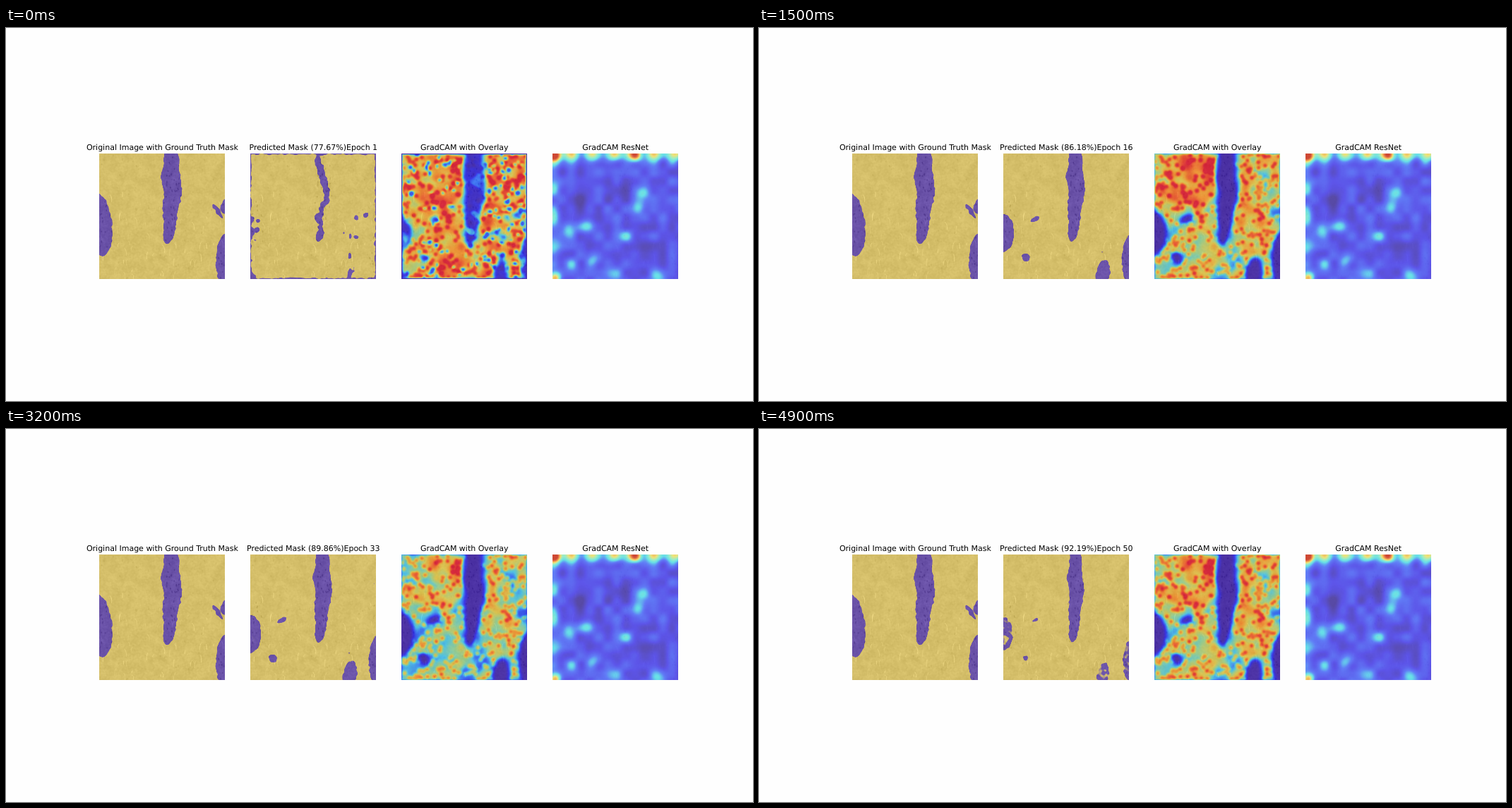
Animation of 1058x529 px, one loop 5000 ms. Source, as an HTML page with a canvas:

```html
<!DOCTYPE html>
<html lang="en">
<head>
<meta charset="utf-8">
<title>Segmentation training</title>
<style>
  html, body { margin: 0; width: 100%; height: 100%; overflow: hidden; background: #fefefe; }
  canvas, svg { position: absolute; left: 0; top: 0; display: block; }
  text { font: 11px "DejaVu Sans", sans-serif; text-anchor: middle; text-rendering: geometricPrecision; }
</style>
</head>
<body>
<canvas id="stage" width="1058" height="529"></canvas>
<svg width="1058" height="529">
  <text x="221.4" y="172.5">Original Image with Ground Truth Mask</text>
  <text x="435.3" y="172.5" id="title"></text>
  <text x="649.2" y="172.5">GradCAM with Overlay</text>
  <text x="863.1" y="172.5">GradCAM ResNet</text>
</svg>
<script>
const N = 178, PAD = 14, SIZE = N + 2 * PAD, TOP = 178, LEFT = [132, 346, 560, 774];
const stage = document.getElementById('stage').getContext('2d');
const title = document.getElementById('title');

// Training state at key epochs, linear in between
const KEYS = [1, 11, 21, 28, 38, 46, 50];
const SCORE = [77.67, 83.63, 88.73, 88.93, 90.79, 91.65, 92.19];
const AREA = [.35, 1, .8, .95, .88, .84, .8];
const WARMTH = [.82, .72, .66, .5, .68, .56, .68];

// Vessel outline as x, y pairs in panel pixels
const VESSEL = [92,-12, 91,20, 86,40, 94,53, 89,70, 92,108, 89,119, 97,132, 104,122,
  109,104, 111,82, 119,54, 114,34, 114,16, 111,-12];
// Ovals: x, y, rx, ry, turn
const TRUTH = [[0, 100, 18, 46, -.12], [180, 152, 15, 38, 0], [168, 82, 13, 2.8, .97], [180, 74, 7, 12, .3]];
const GUESS = [[-1, 113, 18, 31, 0], [181, 150, 15, 38, 0], [141, 170, 11, 22, .15],
  [45, 93, 10, 4, -.5], [32, 148, 7, 9, -.5]];

const clamp = (v, a = 0, b = 1) => Math.min(b, Math.max(a, v));
const smooth = (a, b, v) => { const t = clamp((v - a) / (b - a)); return t * t * (3 - 2 * t); };
const mix = (a, b, t) => a + (b - a) * t;
const hill = (d, width) => Math.exp(-((d / width) ** 2));
const wave = (d, period) => Math.cos(2 * Math.PI * d / period);

function track(values, epoch) {
  let k = 0;
  while (k < KEYS.length - 2 && epoch >= KEYS[k + 1]) k++;
  return mix(values[k], values[k + 1], (epoch - KEYS[k]) / (KEYS[k + 1] - KEYS[k]));
}

function random(seed) {
  return () => {
    seed = seed + 0x6D2B79F5 | 0;
    let t = Math.imul(seed ^ seed >>> 15, 1 | seed);
    t = t + Math.imul(t ^ t >>> 7, 61 | t) ^ t;
    return ((t ^ t >>> 14) >>> 0) / 4294967296;
  };
}

function field(fn) {
  const out = new Float32Array(N * N);
  for (let y = 0, i = 0; y < N; y++) for (let x = 0; x < N; x++) out[i++] = fn(x, y);
  return out;
}

// Value noise, -1 to 1, on a lattice turned by an angle
function noise(cell, seed, turn = .6) {
  const rnd = random(seed), grid = Float32Array.from({ length: 65536 }, () => rnd() * 2 - 1);
  const g = (i, j) => grid[(i & 255) + (j & 255) * 256], cos = Math.cos(turn) / cell, sin = Math.sin(turn) / cell;
  return field((x, y) => {
    const u = x * cos + y * sin, v = y * cos - x * sin, i = Math.floor(u), j = Math.floor(v);
    const a = smooth(0, 1, u - i), b = smooth(0, 1, v - j);
    return mix(mix(g(i, j), g(i + 1, j), a), mix(g(i, j + 1), g(i + 1, j + 1), a), b);
  });
}

const bumps = (radius, points) => field((x, y) =>
  points.reduce((sum, [px, py]) => sum + hill(Math.hypot(x - px, y - py), radius), 0));

function surface() {
  const c = document.createElement('canvas');
  c.width = c.height = SIZE;
  return c.getContext('2d', { willReadFrequently: true });
}
const sharp = surface(), soft = surface();

// Paints in grey, blurs, and returns brightness 0 to 1
function layer(blur, back, paint) {
  sharp.fillStyle = back;
  sharp.fillRect(0, 0, SIZE, SIZE);
  sharp.save();
  sharp.translate(PAD, PAD);
  sharp.fillStyle = sharp.strokeStyle = '#fff';
  paint(sharp);
  sharp.restore();
  soft.filter = `blur(${blur}px)`;
  soft.drawImage(sharp.canvas, 0, 0);
  const data = soft.getImageData(PAD, PAD, N, N).data;
  return Float32Array.from({ length: N * N }, (_, i) => data[i * 4] / 255);
}

function vessel(width = 1, height = 1) {
  const path = new Path2D(), n = VESSEL.length / 2;
  const px = i => 103 + (VESSEL[i % n * 2] - 103) * width, py = i => VESSEL[i % n * 2 + 1] * height;
  path.moveTo((px(0) + px(n - 1)) / 2, py(0));
  for (let i = 0; i < n; i++)
    path.quadraticCurveTo(px(i), py(i), (px(i) + px(i + 1)) / 2, (py(i) + py(i + 1)) / 2);
  return path;
}

function addOval(path, x, y, rx, ry, turn = 0) {
  const oval = new Path2D();
  oval.ellipse(x, y, rx, ry, turn, 0, 7);
  path.addPath(oval);
}

function scatter(count, seed, place) {
  const path = new Path2D(), rnd = random(seed);
  for (let i = 0; i < count; i++) addOval(path, ...place(rnd, i / count));
  return path;
}

function truth() {
  const path = vessel();
  TRUTH.forEach(oval => addOval(path, ...oval));
  return path;
}

// Small patches shrink faster than large ones
function patches(area) {
  const path = new Path2D();
  for (const [x, y, rx, ry, turn] of GUESS) {
    const k = area ** (rx < 11 ? 3 : 1);
    addOval(path, x, y, rx * k, ry * k, turn);
  }
  return path;
}

// Broken pieces along the vessel, bulging right halfway down
const islands = scatter(19, 4, (rnd, t) => {
  const y = t * 125;
  return [98 + 12 * hill(y - 58, 20) + rnd() * 6 - 3, y, 2 + rnd() * 3, 3 + rnd() * 5];
});
const strays = k => scatter(16, 15, rnd => {
  const side = rnd() < .3 ? rnd() * 14 : N - 48 * rnd();
  return [side, 85 + rnd() * 92, k * (1 + rnd() * 3), k * (1 + rnd() * 4)];
});
const specks = k => scatter(10, 6, rnd =>
  [130 + rnd() * 46, 32 + rnd() * 14 + (rnd() < .3 ? 100 : 0), k * (1 + rnd() * 2.5), k * (1.5 + rnd())]);

function paintGuess(c, s) {
  const grey = 255 * s.solid;
  c.fillStyle = `rgb(${grey},${grey},${grey})`;
  c.fill(patches(s.area));
  c.fillStyle = '#fff';
  c.fill(strays(s.early));
  c.fill(specks(s.area ** 6));
  const shape = vessel(mix(s.area, 1, s.early), .97);
  if (!s.early) return c.fill(shape);
  c.save();
  c.clip(shape);
  c.fill(islands);
  c.lineWidth = (1 - s.early) * 24;
  c.stroke(islands);
  c.restore();
  c.globalAlpha = s.early;
  c.lineWidth = 2.6;
  c.strokeRect(0, 0, N, N);
}

function paintCold(c, s) {
  const shape = patches(s.area ** .25);
  shape.addPath(vessel());
  shape.addPath(strays(s.early));
  c.lineWidth = 4;
  c.fill(shape);
  c.stroke(shape);
}

// Tissue grain: pale fibres and dark nuclei
function paintTissue(c) {
  const rnd = random(41);
  for (let i = 0; i < 60; i++) {
    const x = rnd() * N, y = N * Math.sqrt(rnd()), dx = (rnd() - .5) * 9, dy = 3 + rnd() * 9;
    c.globalAlpha = .2 + rnd() * .5;
    c.beginPath();
    c.moveTo(x, y);
    c.quadraticCurveTo(x + dx, y + dy * .4, x + dx * .7, y + dy);
    c.stroke();
  }
  const dot = rnd => [rnd() * N, rnd() * N, 1, 1 + rnd() * 1.2, rnd() - .5];
  c.fillStyle = '#000';
  c.globalAlpha = .25;
  c.fill(scatter(60, 42, dot));
  c.clip(truth());
  c.globalAlpha = .55;
  c.fill(scatter(480, 43, dot));
}

// Evenly spaced colour stops
function palette(...stops) {
  const rgb = stops.map(h => [1, 3, 5].map(k => parseInt(h.slice(k, k + 2), 16)));
  return v => {
    const p = clamp(v) * (rgb.length - 1), k = Math.min(Math.floor(p), rgb.length - 2);
    return rgb[k].map((a, j) => mix(a, rgb[k + 1][j], p - k));
  };
}
const heatColour = palette('#4c32a4', '#3a34e2', '#3e73f0', '#50c0e0', '#96ca8e', '#d8c250', '#ea9236', '#e45034', '#d4283c');
const camColour = palette('#584aa5', '#5c54e8', '#607df6', '#66dee8', '#98ecc8', '#ece27a', '#f4aa52', '#e07048', '#ce4834');
const maskColour = palette('#d4be69', '#6a52a8');

const marks = layer(.6, '#808080', paintTissue), blotch = noise(9, 3), speckle = noise(2.2, 5);
const grain = marks.map((m, i) => (m - .5) * 70 + (blotch[i] + speckle[i]) * 5);
const ragged = noise(4.5, 12), broad = noise(28, 21), medium = noise(12, 22);
const spots = layer(1.8, '#000', c => c.fill(scatter(400, 23, rnd => [rnd() * N, rnd() * N, 3, 3])));
const pits = layer(1.5, '#000', c => c.fill(scatter(150, 24, rnd =>
  [N * rnd() ** .7, rnd() * N, 1.5 + rnd() * 2.5, 1.5 + rnd() * 2.5])));
const hot = bumps(12, [[15, 62], [75, 25], [45, 14], [130, 58], [155, 97]]);
const cold = bumps(13, [[45, 92], [60, 150], [158, 40], [120, 152], [172, 80], [90, 168]]);

function show(panel, tint, colour) {
  const img = stage.createImageData(N, N);
  for (let i = 0; i < N * N; i++) {
    const rgb = colour(i, i % N, Math.floor(i / N));
    for (let k = 0; k < 3; k++) img.data[i * 4 + k] = rgb[k] + grain[i] * tint;
    img.data[i * 4 + 3] = 255;
  }
  stage.putImageData(img, LEFT[panel], TOP);
}

function showMask(panel, cover) {
  show(panel, 1, i => maskColour(cover[i] > .03 ? smooth(.38, .62, cover[i] + ragged[i] * .35) : 0));
}

function showHeat(s) {
  const cover = layer(3, '#000', c => paintCold(c, s)), late = 1 - s.early;
  const corner = .05 + .2 * hill(s.epoch - 11, 7);
  show(2, .6, (i, x, y) => {
    const edge = Math.min(x, y, N - 1 - x, N - 1 - y);
    let v = s.warmth + .1 * broad[i] + .16 * medium[i] + .32 * (spots[i] - .32);
    v += late * (corner * hill(Math.hypot(x - 38, y - 32), 45) + .55 * (1 - s.warmth) * hot[i] - .24 * cold[i]);
    v = Math.max(v - .6 * s.early * pits[i], .2);
    v *= 1 - cover[i] * (1 - s.early * (.1 + .25 * smooth(0, .6, medium[i])));
    return heatColour(v * (1 - mix(.35, 1, s.early) * Math.exp(-edge / 1.3)));
  });
}

function showCam() {
  const ripple = noise(13, 31, 0);
  const cool = bumps(10, [[127, 58], [124, 76], [48, 102], [22, 108], [104, 117], [59, 150], [27, 157], [150, 174], [90, 170]]);
  const dim = bumps(18, [[130, 142], [38, 64], [94, 52]]);
  const corners = bumps(7, [[4, 3], [117, 2], [4, 176]]);
  show(3, .2, (i, x, y) => {
    const rim = hill(y, 10) * (.36 + .14 * wave(x - 56, 29)) + hill(x, 10) * (.16 + .1 * wave(y - 4, 43));
    return camColour(.15 + rim + .2 * cool[i] - .09 * dim[i] + .4 * corners[i] + .09 * ripple[i]);
  });
}

function showEpoch(epoch) {
  const s = {
    epoch,
    area: track(AREA, epoch),
    warmth: track(WARMTH, epoch),
    early: clamp(1 - (epoch - 1) / 8),
    solid: 1 - .32 * (epoch / 50) ** 3
  };
  title.textContent = `Predicted Mask (${track(SCORE, epoch).toFixed(2)}%)Epoch ${epoch}`;
  showMask(1, layer(1.2, '#000', c => paintGuess(c, s)));
  showHeat(s);
}

showMask(0, layer(.8, '#000', c => c.fill(truth())));
showCam();

const start = performance.now();
let shown = 0;
function tick() {
  const epoch = Math.floor((performance.now() - start) % 5000 / 100) + 1;
  if (epoch !== shown) showEpoch(shown = epoch);
  requestAnimationFrame(tick);
}
tick();
</script>
</body>
</html>
```
